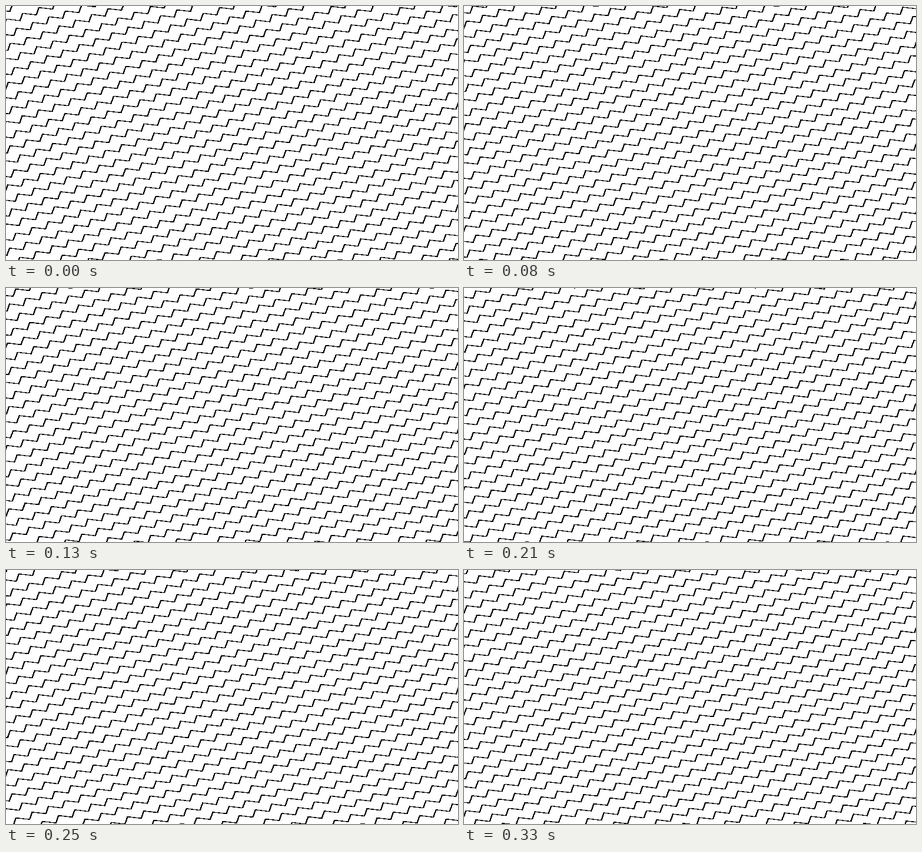
Recreate the animation shown at these times as an HTML page with a canvas. Size 768 px wide and 432 px high, loop 370 ms.

```html
<!DOCTYPE html>
<html lang="en">
<head>
<meta charset="utf-8">
<title>Drifting zigzags</title>
<style>
html, body { margin: 0; width: 100%; height: 100%; overflow: hidden; background: #fff; }
canvas { display: block; }
</style>
</head>
<body>
<canvas id="stage" width="768" height="432"></canvas>
<script>
const W = 768, H = 432, LOOP = 370;
const CHANGES = [40, 80, 130, 170, 210, 250, 290, 330];

// Lattice: ALONG joins neighbouring steps of a zigzag, ACROSS joins neighbouring zigzags.
const ALONG = { x: 27.62, y: -9.787 };
const ACROSS = { x: 17.18, y: 15.66 };
const RISE = { x: 4.5, y: -12.5 };
const ORIGIN = { x: 23.8, y: 24.9 };
const PEN = { x: 2.3, y: 1.4 };   // wide, flat nib
const DRIFT = 0.105;              // part of ACROSS moved per step

const ctx = document.getElementById('stage').getContext('2d', { willReadFrequently: true });

function drawZigzag(row) {
  const x0 = ORIGIN.x + row * ACROSS.x;
  const y0 = ORIGIN.y + row * ACROSS.y;
  const first = Math.floor(-x0 / ALONG.x) - 2;
  const last = Math.ceil((W - x0) / ALONG.x) + 2;
  ctx.beginPath();
  for (let i = first; i <= last; i++) {
    const x = x0 + i * ALONG.x;
    const y = y0 + i * ALONG.y;
    ctx.lineTo(x, y);
    ctx.lineTo(x + RISE.x, y + RISE.y);
  }
  ctx.save();
  ctx.scale(PEN.x, PEN.y);
  ctx.stroke();
  ctx.restore();
}

// Reduce smoothed edges to pure black and white.
function harden() {
  const image = ctx.getImageData(0, 0, W, H);
  const px = image.data;
  for (let i = 0; i < px.length; i += 4) {
    px[i] = px[i + 1] = px[i + 2] = px[i] < 128 ? 0 : 255;
  }
  ctx.putImageData(image, 0, 0);
}

function draw(step) {
  ctx.fillStyle = '#fff';
  ctx.fillRect(0, 0, W, H);
  ctx.strokeStyle = '#000';
  ctx.lineWidth = 1;
  ctx.lineJoin = 'miter';
  for (let row = -4; row < 36; row++) drawZigzag(row + step * DRIFT);
  harden();
}

const start = performance.now();
let shown = -1;

function tick() {
  const t = (performance.now() - start) % LOOP;
  const step = CHANGES.filter(c => c <= t).length;
  if (step !== shown) {
    draw(step);
    shown = step;
  }
  requestAnimationFrame(tick);
}
tick();
</script>
</body>
</html>
```
